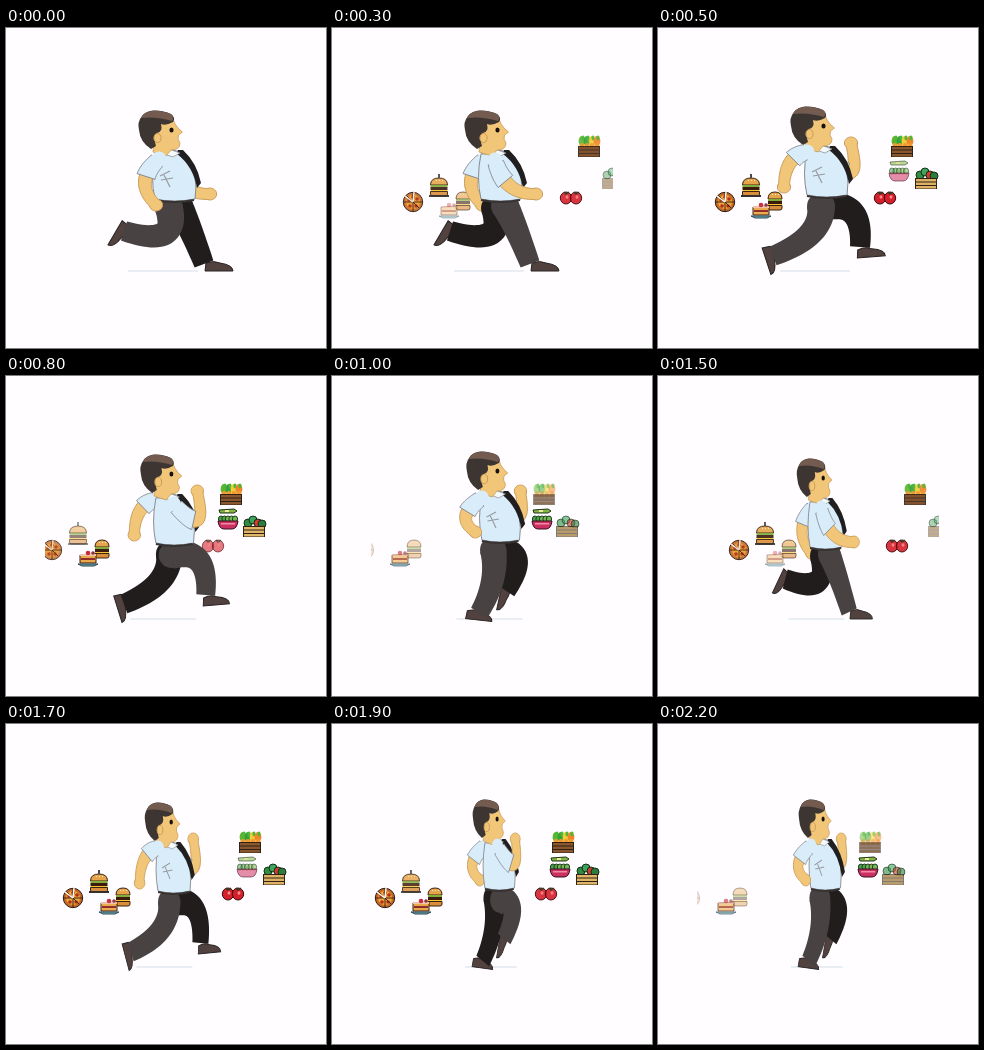
An HTML page with a canvas for the animation above (2300 ms loop, 320 by 320 pixels).

```html
<!DOCTYPE html>
<html>
<head>
<meta charset="utf-8">
<style>
html, body { margin: 0; width: 100%; height: 100%; overflow: hidden; background: #fffdff; }
canvas { display: block; width: 100vw; height: 100vh; object-fit: contain; }
</style>
</head>
<body>
<canvas id="stage" width="320" height="320"></canvas>
<script>
const g = document.getElementById('stage').getContext('2d');
const PAPER = '#fffdff', SKIN = '#f2c678', SKIN_EDGE = '#c99b58', SHIRT = '#d9ecf9', SHIRT_EDGE = '#85898f';
const NEAR = '#484242', FAR = '#211d1d';
const clamp = v => Math.max(0, Math.min(1, v));

function shape(d, fill, stroke, width = 1) {
  const p = new Path2D(d);
  if (fill) { g.fillStyle = fill; g.fill(p); }
  if (stroke) { g.strokeStyle = stroke; g.lineWidth = width; g.stroke(p); }
}
function rect(x, y, w, h, fill) {
  g.fillStyle = fill;
  g.fillRect(x, y, w, h);
}
function oval(x, y, rx, ry, fill, stroke, turn = 0) {
  g.beginPath();
  g.ellipse(x, y, rx, ry, turn, 0, 7);
  g.fillStyle = fill;
  g.fill();
  if (stroke) { g.strokeStyle = stroke; g.lineWidth = 1; g.stroke(); }
}

// Tapered tube with flat ends through three joints, drawn between u0 and u1.
function tube([ax, ay, bx, by, cx, cy], r0, r1, fill, stroke, u0 = 0, u1 = 1) {
  const qx = 2 * bx - (ax + cx) / 2, qy = 2 * by - (ay + cy) / 2;
  const left = [], right = [];
  for (let i = 0; i <= 24; i++) {
    const u = u0 + (u1 - u0) * i / 24, v = 1 - u, r = r0 + (r1 - r0) * i / 24;
    const x = v * v * ax + 2 * u * v * qx + u * u * cx, y = v * v * ay + 2 * u * v * qy + u * u * cy;
    const dx = v * (qx - ax) + u * (cx - qx), dy = v * (qy - ay) + u * (cy - qy), k = r / Math.hypot(dx, dy);
    left.push([x - dy * k, y + dx * k]);
    right.unshift([x + dy * k, y - dx * k]);
  }
  shape('M' + left.concat(right).join('L') + 'Z', fill, stroke);
}

// Joints are x,y triples; shoes are x, y, angle.
const poses = [
  { dy: 0, // contact
    leadLeg: [173, 178, 184, 201, 198, 236], leadShoe: [212, 239, 0],
    trailLeg: [163, 180, 157, 206, 118, 203], trailShoe: [113, 206, 2.1],
    leadArm: [163, 132, 178, 158, 204, 166], trailArm: [153, 131, 139, 154, 150, 177] },
  { dy: -7, // passing
    leadLeg: [170, 176, 186, 186, 175, 215], leadShoe: [172, 220, 1.8],
    trailLeg: [161, 174, 160, 205, 146, 237], trailShoe: [145, 240, .1],
    leadArm: [166, 129, 188, 147, 190, 122], trailArm: [149, 129, 132, 147, 142, 163] },
  { dy: -4, // push-off
    leadLeg: [166, 179, 195, 185, 202, 219], leadShoe: [212, 225, -.08],
    trailLeg: [163, 178, 152, 206, 115, 228], trailShoe: [112, 231, 1.25],
    leadArm: [168, 132, 193, 148, 193, 119], trailArm: [149, 128, 132, 139, 126, 163] }
];

function leg(joints, [x, y, turn], color) {
  g.save();
  g.translate(x, y);
  g.rotate(turn);
  shape('M-13,4L-12,-4Q-4,-7 2,-4Q15,-2 15,4Z', '#51423f', '#282222');
  g.restore();
  oval(joints[0], joints[1], 14, 13, color);
  tube(joints, 14, 10, color);
}
function arm(joints) {
  const [sx, sy, , , x, y] = joints;
  oval(x, y, 6.6, 6, SKIN, SKIN_EDGE);
  tube(joints, 7, 5.3, SKIN, SKIN_EDGE, .3);
  oval(x, y, 6, 5.4, SKIN);
  tube(joints, 8, 9.5, SHIRT, SHIRT_EDGE, .04, .38);
  oval(sx, sy, 7.6, 7.6, SHIRT);
}
function head() {
  shape('M150,97L167,91Q169,97 172,100L176.5,104L172.5,107L172,111L174,115Q174,122 165,122L160,128L147,124Z', SKIN, SKIN_EDGE, .8);
  shape('M136,88C142,80 156,82 165,86Q170,90 167,94Q160,98 155,96Q157,104 151,105Q147,109 150,118L145,121Q134,114 133,102Q131,94 136,88', '#3d3532');
  shape('M135,90C140,80 155,82 165,86Q169,89 166,93Q150,88 135,90', '#745b50');
  oval(151.5, 110, 3.6, 4.6, SKIN, SKIN_EDGE);
  oval(165.5, 102, 2.1, 2.5, '#17120f');
}

function runner(n) {
  const k = n % 6, p = poses[k % 3], leadNear = k > 0 && k < 4;
  const side = lead => lead ? [p.leadLeg, p.leadShoe, p.leadArm] : [p.trailLeg, p.trailShoe, p.trailArm];
  const near = side(leadNear), far = side(!leadNear);
  const slim = [1, .94, .8, .74][Math.floor(n / 6)];
  g.save();
  g.translate(164, 0);
  g.scale(slim, 1);
  g.translate(-164, 0);
  shape('M122,243H192', null, '#e0eaf0', 1.5);
  g.translate(0, p.dy);
  arm(far[2]);
  g.translate(0, -p.dy);
  leg(far[0], far[1], FAR);
  leg(near[0], near[1], NEAR);
  g.translate(0, p.dy);
  shape('M149,126Q164,117 180,127Q193,146 189,171Q168,175 149,171Q144,150 149,126Z', SHIRT, SHIRT_EDGE);
  shape('M149,172Q168,176 188,172', null, '#383333', 2);
  shape('M172,122L177,122Q191,135 195,155L191,160Q187,138 171,126Z', '#211e20');
  shape('M150,126L160,120L174,125L167,129L161,127Z', '#f4f9fc', SHIRT_EDGE, .7);
  head();
  if (!leadNear) shape('M154,148L164,143M155,152L167,150M158,147L164,159', null, '#969a9f', 1.2);
  arm(near[2]);
  g.restore();
}

function bun(w) {
  shape(`M${-w},-1Q${-w},-8 0,-8Q${w},-8 ${w},-1Z`, '#e6a44b', '#3b2313');
  rect(-w, -1, 2 * w, 2, '#7fae3c');
  rect(-w, 1, 2 * w, 3, '#3c1a0d');
  rect(-w, 4, 2 * w, 1.5, '#f5c431');
  shape(`M${-w},5.5H${w}V8Q${w},10 ${w - 2},10H${2 - w}Q${-w},10 ${-w},8Z`, '#d98d3a', '#3b2313');
  for (const x of [-3, 0, 3]) rect(x, -6, 1, 1, '#fff0c0');
}
function crate(y, h, color) {
  rect(-11, y, 22, h, '#2f2014');
  for (let i = 0; i < h - 2; i += 3.5) rect(-10, y + 1 + i, 20, 2.5, color);
}
const draw = {
  pizza() {
    oval(0, 0, 9.7, 9.7, '#c56a24', '#2a1710');
    oval(0, 0, 7, 7, '#efa83e');
    for (const [x, y] of [[-4, -2], [3, 4], [4, -3], [-3, 4], [0, -5]]) oval(x, y, 1.8, 1.8, '#b02d1c');
    shape('M-9,0H9M0,-9V9M-6,-6L6,6', null, '#3f2213', 1);
    shape('M0,0L1,-10M0,0L-8,-6', null, PAPER, 1.4);
  },
  tallBurger() {
    bun(8.5);
    rect(-1, -12, 2, 4, '#4a4a48');
    rect(-10, 9, 20, 2, '#35302c');
  },
  burger() { bun(7); },
  cake() {
    shape('M-8,4V-4L8,-5V4Z', '#e9a94a', '#3a1c13');
    rect(-7, -1, 14, 2, '#8f2a2a');
    rect(-8, -5, 16, 2, '#f0c5ae');
    oval(0, -6, 2.3, 2.3, '#c92c34');
    oval(5, -6, 1.8, 1.8, '#8d3148');
    shape('M-10,5H10L6,7H-6Z', '#71aebc', '#28434c');
  },
  carrots() {
    for (const [x, c] of [[-7, '#5cb52f'], [-2, '#38a23a'], [3, '#f2cd37'], [8, '#f0852b']]) {
      oval(x, -5, 3.4, 5, c);
      oval(x + 1, -8, 1.6, 2.4, '#4fb83a');
      oval(x, 0, 2.5, 3, '#f29a2e');
    }
    crate(0, 11, '#8a562e');
  },
  veg() {
    for (const [x, y, c] of [[-6, -4, '#2f8b3e'], [-1, -7, '#3da35a'], [4, -4, '#d63a2c'], [8, -3, '#2c7a3c']])
      oval(x, y, 4, 4, c, '#12301a');
    crate(-1, 11, '#dfb567');
  },
  bowl() {
    shape('M-9,-12L6,-13L9,-11L6,-9L-8,-9Z', '#7fb83b', '#20301c');
    rect(-3, -12, 4, 2, '#f4e7a2');
    for (let x = -7; x < 9; x += 3.5) oval(x, -3, 2.6, 3, x < 0 ? '#4aa34a' : '#76b954', '#243d22');
    shape('M-10,-1H10Q9,7 4,7H-4Q-9,7 -10,-1Z', '#cc2f61', '#35121f');
    rect(-7, 1, 14, 1.5, '#f08ba6');
  },
  tomatoes() {
    for (const [x, y] of [[-5, 0], [5, 0]]) {
      oval(x, y, 5.7, 6, '#d41f2c', '#3f080c');
      oval(x + 1, y - 1, 1.5, 1.8, '#fb8a8a');
      shape(`M${x - 2},${y - 6}L${x},${y - 4}L${x + 3},${y - 6}`, null, '#2a3f22', 1.5);
    }
  }
};

// Name, x and y at step 5, speed, fade-in step, fade-out step.
const foods = [
  ['pizza', 66.5, 174, 7, 0, 10.6], ['tallBurger', 93, 158, 7.1, 0, 9.8],
  ['burger', 117, 172, 7, 1, 11.3], ['cake', 102.5, 183, 7, 1.8, 12],
  ['carrots', 244, 118, 6.4, 0, 11.7], ['veg', 267.5, 151, 6.5, 1.7, 12],
  ['bowl', 241, 146, 6.3, 3.2, 13.7], ['tomatoes', 226.5, 170, 6.4, 0, 10]
];
function food(k) {
  g.save();
  g.beginPath();
  g.rect(39, 0, 242, 320);
  g.clip();
  for (const [name, x, y, speed, start, end] of foods) {
    const alpha = clamp(Math.min(k - start, end - k) * .3);
    if (!alpha) continue;
    g.save();
    g.globalAlpha = alpha;
    g.translate(Math.round(x - speed * (k - 5)), y);
    draw[name]();
    g.restore();
  }
  g.restore();
}

function frame() {
  const n = Math.floor(performance.now() % 2300 / 100);
  rect(0, 0, 320, 320, PAPER);
  food(n % 12);
  if (n >= 12) food(n);
  runner(n);
  requestAnimationFrame(frame);
}
frame();
</script>
</body>
</html>
```
